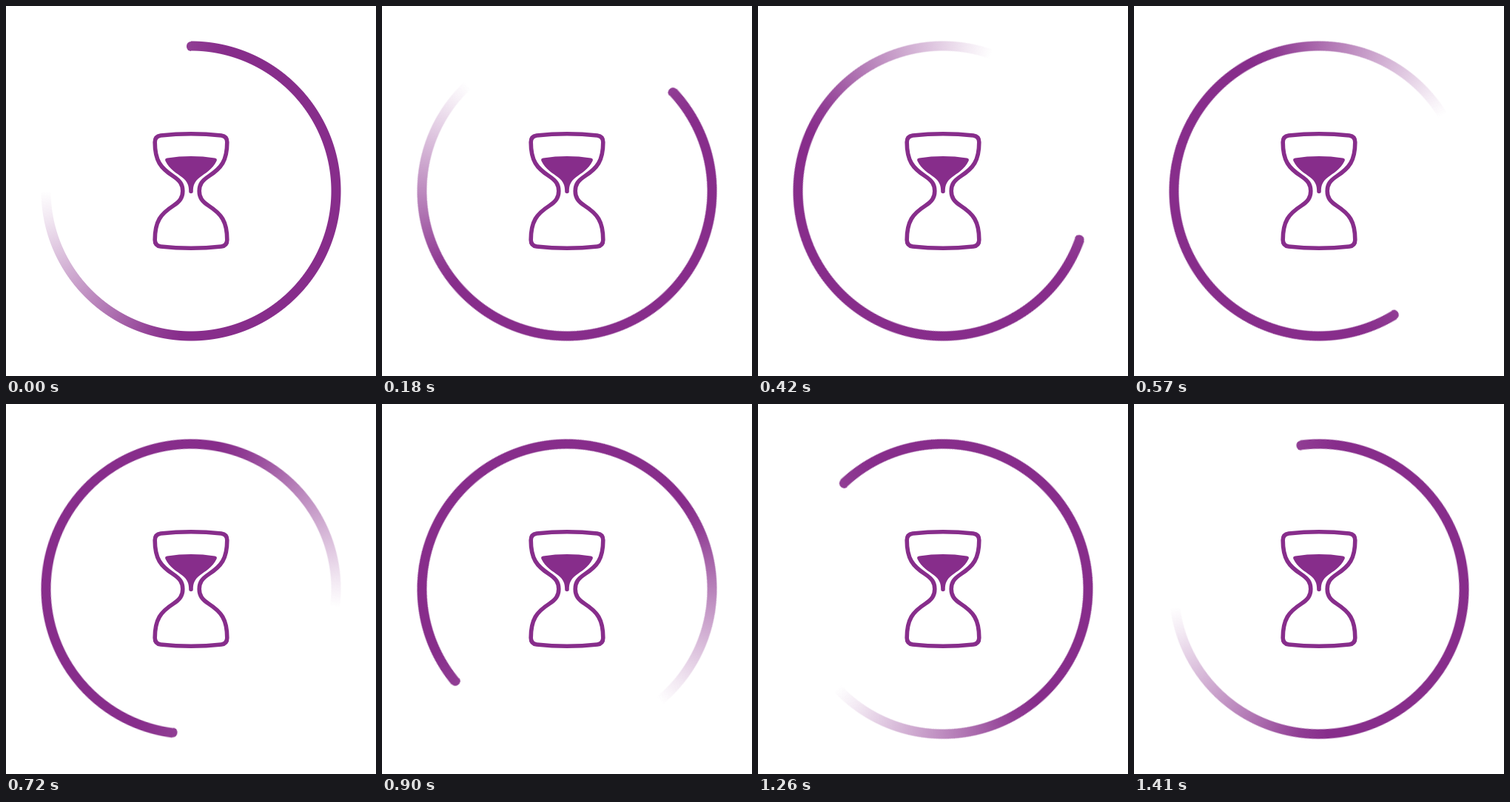
An HTML page without scripts for the animation above (1.44 s loop, 500x500 px).

```html
<!DOCTYPE html>
<html lang="en">
<head>
<meta charset="utf-8">
<title>Loading</title>
<style>
  :root { --ink: #872d8b; }
  html, body { margin: 0; width: 100%; height: 100%; overflow: hidden; background: #fff; }
  .stage { position: relative; width: 500px; height: 500px; }
  .stage > * { position: absolute; inset: 0; }

  /* The first half turn is slightly quicker than the second. */
  .spinner { animation: turn 1440ms infinite; }
  @keyframes turn {
    0% { transform: rotate(0deg); animation-timing-function: steps(23, end); }
    47.916% { transform: rotate(180deg); animation-timing-function: steps(25, end); }
    100% { transform: rotate(360deg); }
  }

  .ring {
    position: absolute;
    inset: 0;
    background: conic-gradient(
      rgb(135 45 139 / .93), rgb(135 45 139) 14deg 184deg,
      rgb(135 45 139 / .92) 195deg, rgb(135 45 139 / .64) 216deg,
      rgb(135 45 139 / .32) 242deg, rgb(135 45 139 / .1) 260deg,
      rgb(135 45 139 / 0) 270deg);
    -webkit-mask: radial-gradient(circle at center, #0000 189px, #000 190px 202px, #0000 203px);
    mask: radial-gradient(circle at center, #0000 189px, #000 190px 202px, #0000 203px);
  }
  .cap {
    position: absolute;
    left: 243.5px;
    top: 47.5px;
    width: 6.5px;
    height: 13px;
    border-radius: 6.5px 0 0 6.5px;
    background: rgb(135 45 139 / .92);
  }
  .glass { fill: none; stroke: var(--ink); stroke-width: 5.6; }
  .sand { fill: var(--ink); }
</style>
</head>
<body>
<div class="stage">
  <div class="spinner">
    <div class="ring"></div>
    <div class="cap"></div>
  </div>
  <svg width="500" height="500" viewBox="0 0 500 500">
    <path class="glass" d="M209 175 Q250 170.4 291 175 Q298.8 176 298.8 184
      C298.8 209 291 219 274 230 C265 236 261.2 241 261.2 250
      C261.2 259 265 264 274 270 C291 281 298.8 291 298.8 316
      Q298.8 324 291 325 Q250 329.6 209 325 Q201.2 324 201.2 316
      C201.2 291 209 281 226 270 C235 264 238.8 259 238.8 250
      C238.8 241 235 236 226 230 C209 219 201.2 209 201.2 184
      Q201.2 176 209 175Z"/>
    <path class="sand" d="M218 205.5 Q250 200.6 282 205.5 Q286 206.2 284.5 209.5
      C279 221 269 226 262 231.5 C255 237 252.8 242 252.8 250.5
      a2.8 2.8 0 0 1 -5.6 0 C247.2 242 245 237 238 231.5
      C231 226 221 221 215.5 209.5 Q214 206.2 218 205.5Z"/>
  </svg>
</div>
</body>
</html>
```
